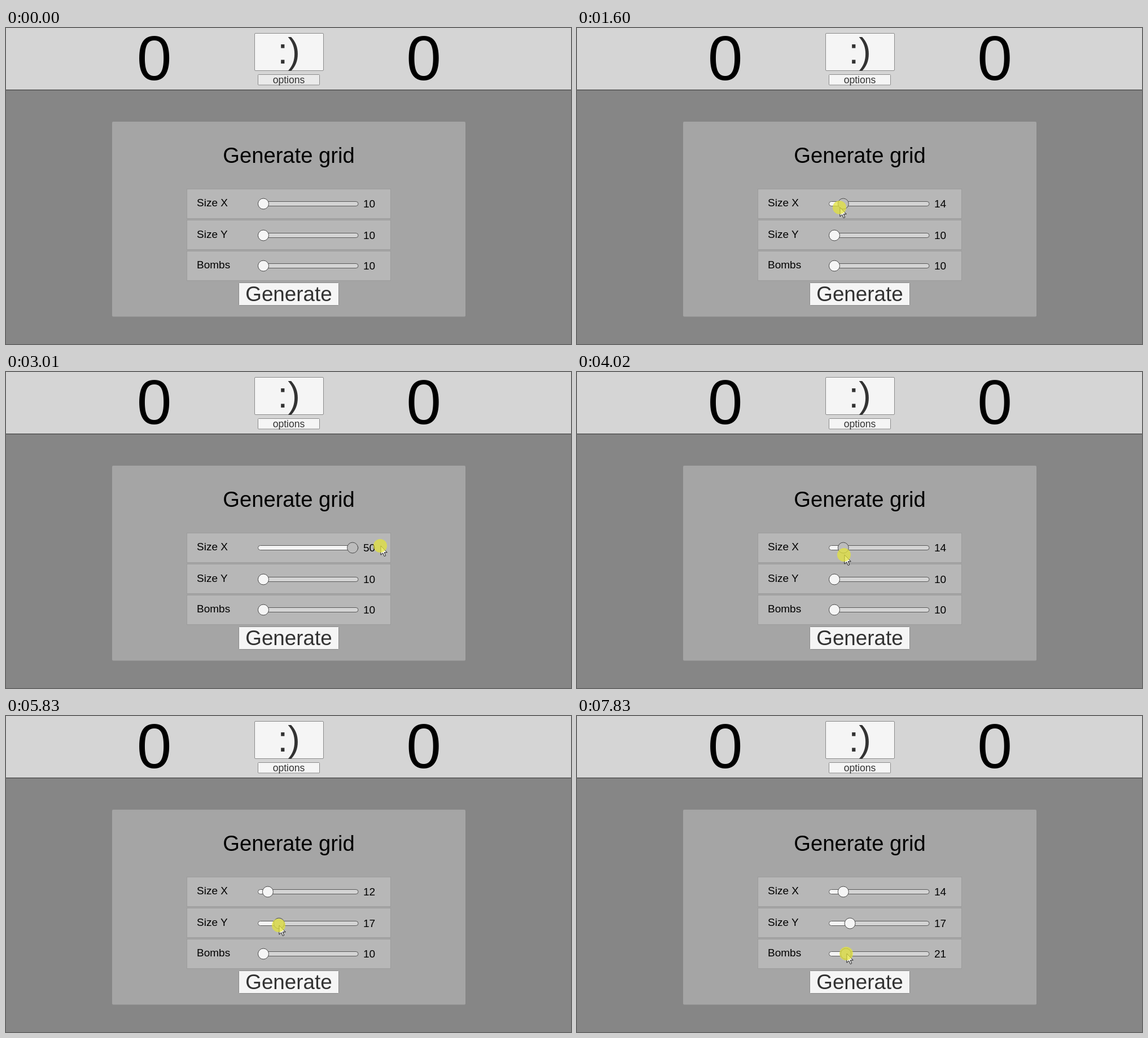
These frames come from a looping animation (1001 px wide and 560 px high, 8 s). An HTML page:

```html
<!DOCTYPE html>
<html lang="en">
<head>
<meta charset="utf-8">
<title>Generate grid</title>
<style>
  html, body { margin: 0; width: 100%; height: 100%; overflow: hidden; background: #868686; }
  svg { display: block; font-family: "Liberation Sans", Arial, sans-serif; }
  .mid { text-anchor: middle; }
  .btn { fill: #f5f5f5; stroke: #8b8b8b; }
  .ink { fill: #323232; }
  .row { fill: #b7b7b7; stroke: #9c9c9c; }
  .track { fill: #d4d4d4; }
  .fill { fill: #f4f4f4; }
  .rim { fill: none; stroke: #5a5a5a; }
  .knob { fill: #f5f5f5; stroke: #4c4c4c; }
  .knob.down { fill: #bcbcbc; }
</style>
</head>
<body>
<svg width="1001" height="560" viewBox="0 0 1001 560">
  <rect width="1001" height="560" fill="#868686"/>
  <rect width="1001" height="109" fill="#d5d5d5"/>
  <rect y="109" width="1001" height="1.6" fill="#585858"/>
  <g class="mid" font-size="111">
    <text x="262.5" y="92">0</text>
    <text x="740" y="92">0</text>
  </g>
  <rect class="btn" x="440.5" y="9.5" width="122" height="66" rx="1.5"/>
  <text class="mid ink" x="501" y="63" font-size="65">:)</text>
  <rect class="btn" id="options" x="446.5" y="82.5" width="109" height="18.5" rx="1"/>
  <text class="mid ink" x="501" y="98" font-size="17.6">options</text>

  <rect x="188" y="166" width="626" height="345.5" rx="2" fill="#a5a5a5"/>
  <text class="mid" x="501" y="239" font-size="38.2">Generate grid</text>
  <g id="rows" font-size="19"></g>
  <rect class="btn" x="412.5" y="451.5" width="177" height="40" rx="1"/>
  <text class="mid ink" x="501" y="484" font-size="36.8">Generate</text>

  <g id="cursor">
    <path d="M1 0V16.2L4.7 12.7L7.3 18.6L9.7 17.5L7.2 11.8H12.2Z" fill="#fff" stroke="#111"/>
    <circle r="12" fill="#e2e23c" fill-opacity=".74"/>
  </g>
</svg>
<script>
const LOOP = 8000, TICKS = 40, MIN = 10, LEFT = 456, SPAN = 158;
const X = 0, Y = 1, BOMBS = 2;

const rows = [
  { label: 'Size X', mid: 311, max: 50 },
  { label: 'Size Y', mid: 367, max: 50 },
  { label: 'Bombs', mid: 421, max: 95 }
];

// Pointer stops: tick, x, y, slider held on the way there
const stops = [
  [1, 440, 170],
  [4, 449, 325],
  [8, 465, 318, X],
  [10, 457, 302, X],
  [12, 464, 311],
  [15, 663, 308, X],
  [16, 663, 308, X],
  [20, 473, 324, X],
  [22, 464, 322, X],
  [24, 456, 367],
  [26, 654, 373, Y],
  [29, 483, 371, Y],
  [32, 460, 306],
  [34, 468, 308, X],
  [37, 457, 421],
  [39, 477, 421, BOMBS]
];

const $ = id => document.getElementById(id);
const all = selector => document.querySelectorAll(selector);

$('rows').innerHTML = rows.map(({ label, mid }, i) => {
  const bar = `x="446.5" y="${mid - 3.5}" height="8" rx="4"`;
  return `
    <rect class="row" x="320.5" y="${285.3 + 55 * i}" width="361" height="52.4"/>
    <text x="338" y="${mid + 4.7}">${label}</text>
    <rect class="track" ${bar} width="177.5"/>
    <rect class="fill" ${bar}/>
    <rect class="rim" ${bar} width="177.5"/>
    <circle class="knob" cy="${mid + .5}" r="9.5"/>
    <text class="value" x="633" y="${mid + 7}"></text>`;
}).join('');
const fills = all('.fill'), knobs = all('.knob'), values = all('.value');

const knobX = (row, value) => LEFT + SPAN * (value - MIN) / (rows[row].max - MIN);

function valueFor(row, x) {
  const u = Math.min(1, Math.max(0, (x - LEFT) / SPAN));
  return Math.round(MIN + u * (rows[row].max - MIN));
}

function pointer(k) {
  const i = Math.max(1, stops.findIndex(s => s[0] >= k));
  const [k0, x0, y0] = stops[i - 1], [k1, x1, y1, held] = stops[i];
  const u = Math.max(0, (k - k0) / (k1 - k0));
  const e = u * u * (3 - 2 * u);
  return { x: x0 + (x1 - x0) * e, y: y0 + (y1 - y0) * e, held };
}

// A knob keeps the distance to the pointer it had when grabbed
function simulate() {
  const states = [], now = rows.map(() => MIN);
  let last = pointer(0), grip = 0;
  for (let k = 0; k < TICKS; k++) {
    const p = pointer(k), row = p.held;
    if (row !== undefined) {
      if (row !== last.held) grip = knobX(row, now[row]) - last.x;
      now[row] = valueFor(row, p.x + grip);
    }
    // The pressed tint shows one tick after the grab
    states.push({ ...p, values: [...now], down: row === last.held ? row : -1 });
    // Remember the grab point, which is where the previous stop lies
    const next = pointer(k + 1 < TICKS ? k + 1 : k);
    last = next.held === row ? p : { ...p, held: row };
  }
  return states;
}
const states = simulate();

function draw(k) {
  const s = states[k];
  $('cursor').setAttribute('transform', `translate(${s.x} ${s.y})`);
  $('cursor').style.display = k ? '' : 'none';
  $('options').style.fill = k ? '' : '#eaeaea';
  s.values.forEach((value, i) => {
    const x = knobX(i, value);
    knobs[i].setAttribute('cx', x);
    knobs[i].classList.toggle('down', s.down === i);
    fills[i].setAttribute('width', x - 446.5);
    values[i].textContent = value;
  });
}

// Ticks fall on a 10 ms clock
const startOf = k => Math.floor(k * 20.09) * 10;

let shown = -1;
function frame() {
  const time = performance.now() % LOOP;
  let k = TICKS - 1;
  while (startOf(k) > time) k--;
  if (k !== shown) draw(shown = k);
  requestAnimationFrame(frame);
}
frame();
</script>
</body>
</html>
```
